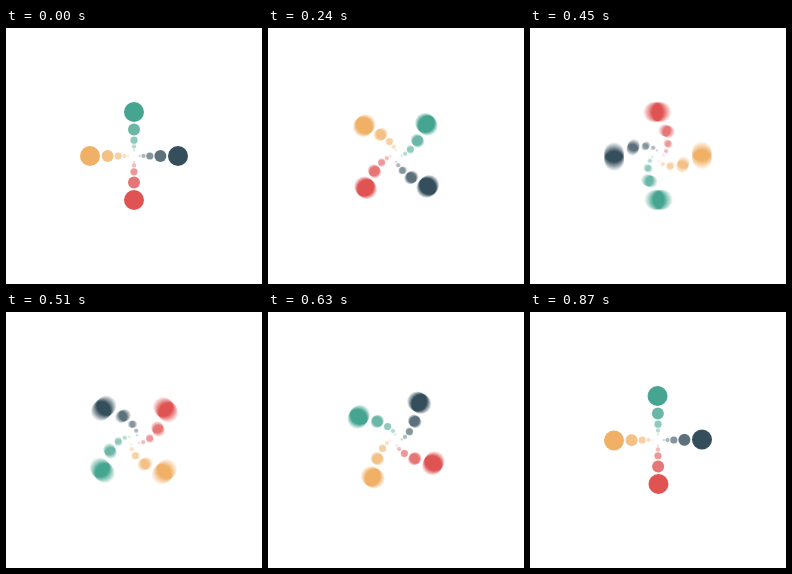
An HTML page with a canvas for the animation above (0.9 s loop, 256 px wide and 256 px high).

```html
<!DOCTYPE html>
<html lang="en">
<head>
<meta charset="utf-8">
<title>Spinning dots</title>
<style>
  html, body { margin: 0; width: 100%; height: 100%; overflow: hidden; background: #fff; }
  canvas { display: block; }
</style>
</head>
<body>
<canvas id="stage" width="256" height="256"></canvas>
<script>
const SIZE = 256, CENTER = SIZE / 2;
const LOOP = 900, STEP = 30;
const SHUTTER = 15, SHUTTER_START = -8, SAMPLES = 16;
const COLORS = ['#46a591', '#344e5c', '#df5453', '#f0b167']; // top, right, bottom, left
const RINGS = 5, SHRINK = 0.6, ORBIT = 44, DOT = 10;
const BEND = 20;

// The blurred area: a square around everything that moves.
const AREA = 120, CORNER = CENTER - AREA / 2;

const stage = document.getElementById('stage').getContext('2d');
const layerCanvas = document.createElement('canvas');
layerCanvas.width = layerCanvas.height = AREA;
const layer = layerCanvas.getContext('2d', { willReadFrequently: true });
const sums = new Float32Array(AREA * AREA * 4);
const blurred = stage.createImageData(AREA, AREA);

const smooth = s => s * s * (3 - 2 * s);

// cubic-bezier(.5, 0, .5, 1)
function ease(x) {
  let low = 0, high = 1;
  for (let i = 0; i < 24; i++) {
    const s = (low + high) / 2;
    if (1.5 * s * (1 - s) + s ** 3 < x) low = s; else high = s;
  }
  return smooth((low + high) / 2);
}

function drawPose(time) {
  const p = ((time + LOOP) % LOOP) / LOOP;
  const spin = 360 * ease(p);
  const bend = BEND * smooth(1 - Math.abs(2 * p - 1));

  layer.globalAlpha = 1;
  layer.fillStyle = '#fff';
  layer.fillRect(0, 0, AREA, AREA);
  for (let ring = 0; ring < RINGS; ring++) {
    const scale = SHRINK ** ring;
    layer.globalAlpha = 1 - ring / RINGS;
    COLORS.forEach((color, arm) => {
      const angle = (spin + ring * bend + arm * 90 - 90) * Math.PI / 180;
      layer.fillStyle = color;
      layer.beginPath();
      layer.arc(AREA / 2 + ORBIT * scale * Math.cos(angle),
                AREA / 2 + ORBIT * scale * Math.sin(angle),
                DOT * scale, 0, 2 * Math.PI);
      layer.fill();
    });
  }
}

// Motion blur: average several poses across the shutter interval.
function render(time) {
  sums.fill(0);
  for (let i = 0; i < SAMPLES; i++) {
    drawPose(time + SHUTTER_START + SHUTTER * i / SAMPLES);
    const pixels = layer.getImageData(0, 0, AREA, AREA).data;
    for (let k = 0; k < sums.length; k++) sums[k] += pixels[k];
  }
  for (let k = 0; k < sums.length; k++) blurred.data[k] = Math.round(sums[k] / SAMPLES);
  stage.putImageData(blurred, CORNER, CORNER);
}

stage.fillStyle = '#fff';
stage.fillRect(0, 0, SIZE, SIZE);

const start = performance.now();
let shown = -1;
function tick() {
  const elapsed = Math.max(0, performance.now() - start) % LOOP;
  const time = Math.floor(elapsed / STEP) * STEP;
  if (time !== shown) render(shown = time);
  requestAnimationFrame(tick);
}
tick();
</script>
</body>
</html>
```
